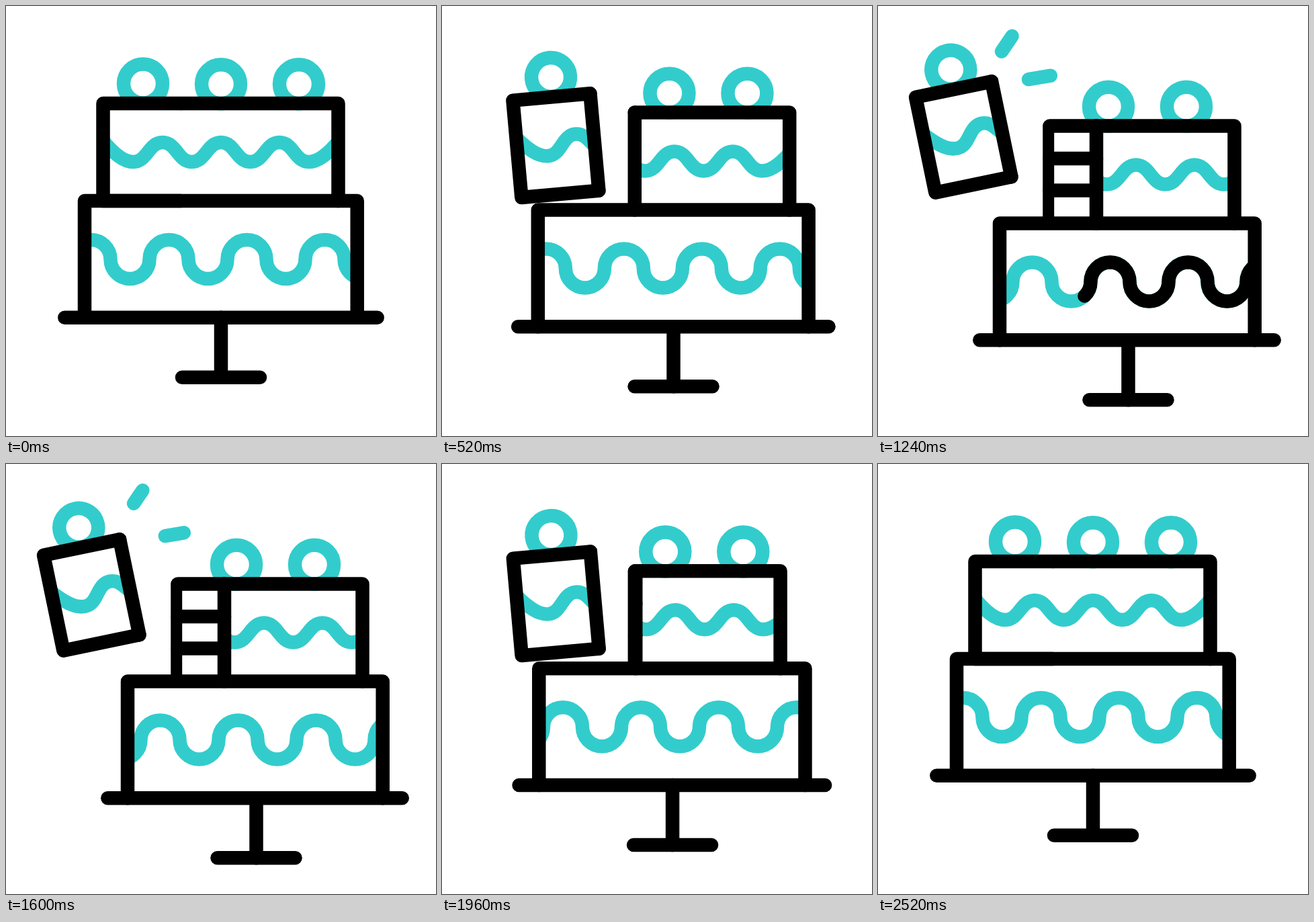
An HTML page with a canvas for the animation above (2.6 s loop, 640x640 px).

```html
<!DOCTYPE html>
<html lang="en">
<head>
<meta charset="utf-8">
<title>Cake</title>
<style>
  html, body { margin: 0; width: 100%; height: 100%; overflow: hidden; background: #fff; }
  canvas { display: block; width: 100vw; height: 100vh; }
</style>
</head>
<body>
<canvas id="stage" width="640" height="640"></canvas>
<script>
const ctx = document.getElementById('stage').getContext('2d');
const LOOP = 2600, STEP = 40;
const TEAL = '#33cccc', BLACK = '#000', LINE = 20.5;
const RADIUS = 29, HALF_WAVE = Math.PI * RADIUS;

const mix = (a, b, k) => a + (b - a) * k;
const unit = (t, from, to) => Math.min(1, Math.max(0, (t - from) / (to - from)));
const smooth = u => u * u * (3 - 2 * u);

// Cubic bezier (.8, 0, .2, 1), solved by bisection.
function steep(u) {
  let lo = 0, hi = 1;
  for (let i = 0; i < 24; i++) {
    const s = (lo + hi) / 2, r = 1 - s;
    if (2.4 * s * r * r + 0.6 * s * s * r + s * s * s < u) lo = s; else hi = s;
  }
  return smooth(lo);
}

const thereAndBack = (t, a, b, c, d, ease = steep) =>
  ease(unit(t, a, b)) - ease(unit(t, c, d));

function stroke(color, width = LINE) {
  ctx.strokeStyle = color;
  ctx.lineWidth = width;
  ctx.stroke();
}

function line(points, color = BLACK, width = LINE) {
  ctx.beginPath();
  points.forEach(([x, y]) => ctx.lineTo(x, y));
  stroke(color, width);
}

function ring(x, y) {
  ctx.beginPath();
  ctx.arc(x, y, RADIUS, 0, 2 * Math.PI);
  stroke(TEAL);
}

function clipped(x0, y0, x1, y1, draw) {
  ctx.save();
  ctx.beginPath();
  ctx.rect(x0, y0, x1 - x0, y1 - y0);
  ctx.clip();
  draw();
  ctx.restore();
}

function upperWave() {
  const low = 232, high = 203, half = 43.5, k = 20.5;
  ctx.beginPath();
  ctx.moveTo(144, 200);
  ctx.bezierCurveTo(159, 218, 174, low, 189.5, low);
  for (let i = 0; i < 6; i++) {
    const x = 189.5 + half * i;
    const [from, to] = i % 2 ? [high, low] : [low, high];
    ctx.bezierCurveTo(x + k, from, x + half - k, to, x + half, to);
  }
  ctx.bezierCurveTo(466, low, 481, 218, 496, 200);
  stroke(TEAL);
}

function lowerWave(shift, color) {
  ctx.beginPath();
  for (let i = -1; i < 9; i++) {
    ctx.arc(126.5 + 2 * RADIUS * i + shift, 377, RADIUS, Math.PI, 0, i % 2 !== 0);
  }
  stroke(color);
}

function cake(t, divider) {
  const move = thereAndBack(t, 45, 1035, 1620, 2280);
  const slide = thereAndBack(t, 250, 930, 1600, 2280);
  const shrink = thereAndBack(t, 315, 915, 1600, 2280);
  const upperShrink = thereAndBack(t, 315, 915, 1640, 2325);
  const ladder = thereAndBack(t, 530, 1000, 1600, 2055);
  const shift = 39 * thereAndBack(t, 300, 1080, 1640, 2335);
  const plateRight = 552.7 - 27 * shrink, lowerRight = 522.7 - 26 * shrink;
  const upperRight = 494.5 - 28 * upperShrink;
  const stem = 320 - 11.5 * shrink;

  ctx.save();
  ctx.translate(64 * move, 33.5 * move);

  for (const x of [320, 436]) ring(x - 41 * slide, 116.3);
  clipped(260, 145, upperRight, 290, upperWave);

  clipped(117, 290, lowerRight, 463, () => {
    lowerWave(shift, TEAL);
    const end = 7 * smooth(unit(t, 600, 1180));
    const start = 7 * smooth(unit(t, 1025, 1595));
    if (end > start) {
      ctx.setLineDash([(end - start) * HALF_WAVE, 1e4]);
      ctx.lineDashOffset = -(start + 0.5) * HALF_WAVE;
      lowerWave(shift, BLACK);
    }
  });

  if (ladder > 0) {
    const post = mix(260, 189.7, ladder);
    line([[261, 145], [post, 145], [post, 290]], BLACK, 17);
    for (const y of [145, 193.5, 241]) line([[post + 2, y], [261, y]]);
  }

  line([[261, 145], [upperRight, 145], [upperRight, 290]]);
  if (divider > 0) line([[261, 145], [261, mix(145, 290, divider)]]);
  line([[117, 463.7], [117, 290], [lowerRight, 290], [lowerRight, 463.7]]);
  line([[87.3, 463.7], [plateRight, 463.7]]);
  line([[stem, 463.7], [stem, 552.8]]);
  line([[stem - 58, 552.8], [stem + 58, 552.8]]);
  ctx.restore();
}

function slice(move, divider) {
  ctx.save();
  ctx.translate(202.5 - 75 * move, 217.5 - 22.5 * move);
  ctx.rotate(-11.7 * move * Math.PI / 180);
  ctx.translate(-202.5, -217.5);
  ring(204, 115.5);
  clipped(144.5, 145, 262, 290, upperWave);
  line([[260, 145], [144.5, 145], [144.5, 290], [260, 290]]);
  if (divider > 0) line([[260, 145], [260, mix(145, 290, divider)]]);
  ctx.restore();
}

function sparks(t, move) {
  const end = 0.715 * smooth(unit(t, 580, 880)) + 0.285 * smooth(unit(t, 1400, 1750));
  const start = smooth(unit(t, 1440, 1900));
  if (end - start < 0.01) return;
  ctx.save();
  ctx.translate(75 * (1 - move), 22.5 * (1 - move));
  for (const [x0, y0, x1, y1] of [[184, 67.7, 205.8, 35.6], [224, 109.2, 270, 101.5]]) {
    const at = k => [mix(x0, x1, k), mix(y0, y1, k)];
    line([at(start), at(end)], TEAL);
  }
  ctx.restore();
}

function render(now) {
  const t = Math.floor((now % LOOP) / STEP) * STEP;
  const divider = thereAndBack(t, 40, 200, 2340, 2500, smooth);
  const move = thereAndBack(t, 40, 1025, 1621, 2281);

  ctx.fillStyle = '#fff';
  ctx.fillRect(0, 0, 640, 640);
  ctx.lineCap = ctx.lineJoin = 'round';
  cake(t, divider);
  slice(move, divider);
  sparks(t, move);
}

function tick(now) {
  render(now);
  requestAnimationFrame(tick);
}

render(0);
requestAnimationFrame(tick);
</script>
</body>
</html>
```
